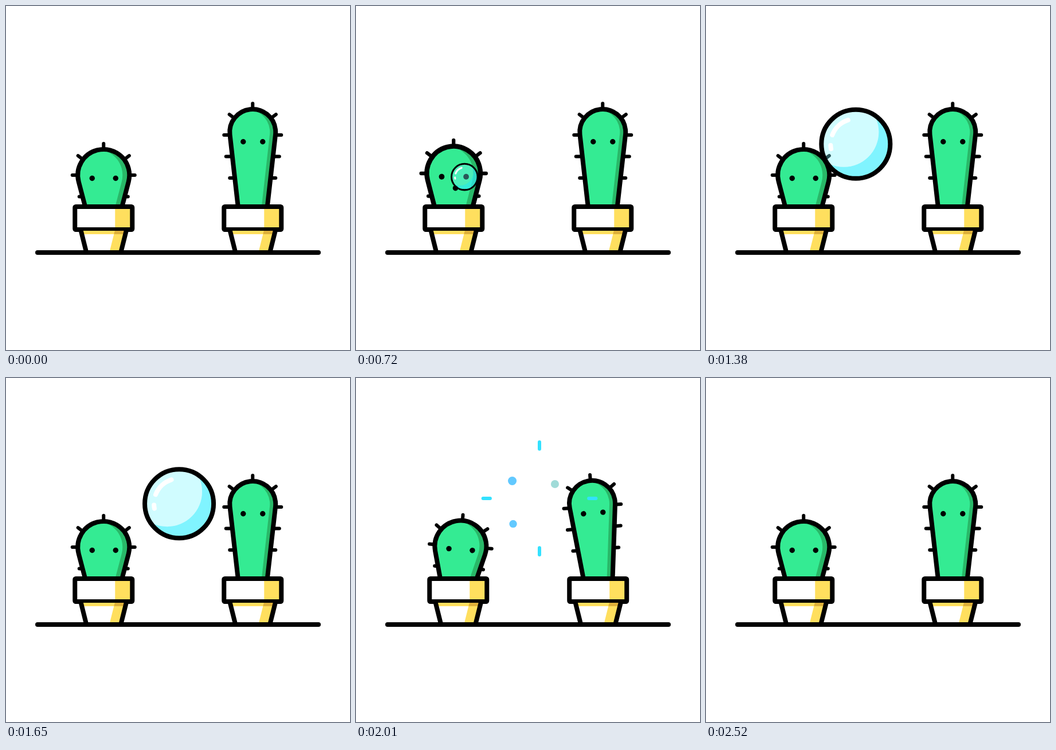
An HTML page with a canvas for the animation above (2550 ms loop, 600 by 600 pixels).

```html
<!DOCTYPE html>
<html lang="en">
<head>
<meta charset="utf-8">
<title>Cactus bubble</title>
<style>
  html, body { margin: 0; width: 100%; height: 100%; overflow: hidden; background: #fff; }
  canvas { display: block; }
</style>
</head>
<body>
<canvas id="stage" width="600" height="600"></canvas>
<script>
const ctx = document.getElementById('stage').getContext('2d');
const LOOP = 2550, STEP = 30, BLOW = 660, BURST = 1770, TAU = 2 * Math.PI;
const GREEN = '#34eb93', DARK_GREEN = '#29b868', YELLOW = '#ffdf5e', DARK_YELLOW = '#deb03a';

// A round head of radius r at height cy, tapering to a half width of base at y = 360.
const small = { x: 170.25, r: 45, cy: 295, base: 29.5, shade: 12, eyeX: 20.5, eyeY: 300.5, sideY: 295, tips: [54.5, 42.5] };
const tall = { x: 430.25, r: 40, cy: 220, base: 24.4, shade: 10, eyeX: 17, eyeY: 236.7, sideY: 225, tips: [50, 46.5, 40] };

const clamp = u => Math.min(1, Math.max(0, u));
const ramp = (t, from, to) => (1 - Math.cos(Math.PI * clamp((t - from) / (to - from)))) / 2;
const easeOut = (u, power) => 1 - (1 - clamp(u)) ** power;

// Damped swing after the burst, slowing down as it dies away.
function rock(t, size, swings, slowing, decay) {
  const u = clamp((t - BURST) / 740);
  return size * (1 - u) ** decay * Math.sin(Math.PI * swings * u ** slowing);
}

function line(x1, y1, x2, y2, width, color = '#000') {
  ctx.lineWidth = width;
  ctx.strokeStyle = color;
  ctx.beginPath();
  ctx.moveTo(x1, y1);
  ctx.lineTo(x2, y2);
  ctx.stroke();
}

function disc(x, y, r, color = '#000') {
  ctx.fillStyle = color;
  ctx.beginPath();
  ctx.arc(x, y, r, 0, TAU);
  ctx.fill();
}

function drawSpines(c) {
  line(0, c.cy - c.r - 10, 0, c.cy - c.r, 6);
  for (const side of [-1, 1]) {
    const dx = side * Math.cos(0.65), dy = -Math.sin(0.65), out = c.r + 11;
    line(dx * out, c.cy + dy * out, dx * c.r, c.cy + dy * c.r, 6);
    c.tips.forEach((tip, i) => {
      const y = c.sideY + 37.5 * i;
      line(side * tip, y, side * (tip - 8), y, 6);
    });
  }
}

function drawBody(c) {
  const height = 360 - c.cy;
  const tangent = Math.atan2(height, c.base) - Math.acos(c.r / Math.hypot(height, c.base));
  const shape = new Path2D();
  shape.moveTo(-c.base, 360);
  shape.arc(0, c.cy, c.r, Math.PI - tangent, TAU + tangent);
  shape.lineTo(c.base, 360);

  drawSpines(c);
  ctx.save();
  ctx.clip(shape);
  ctx.fillStyle = DARK_GREEN;
  ctx.fill(shape);
  ctx.translate(-c.shade, 0);
  ctx.fillStyle = GREEN;
  ctx.fill(shape);
  ctx.restore();
  ctx.lineWidth = 8;
  ctx.stroke(shape);
  for (const side of [-1, 1]) disc(0.5 + side * c.eyeX, c.eyeY, 4.7);
}

// Part of the tapered pot between two heights, from a left edge given at the rim.
function potSlice(color, left, top, bottom) {
  const inset = y => (y - 390) / 4;
  const slant = left < 0 ? 1 : -1;
  ctx.fillStyle = color;
  ctx.beginPath();
  ctx.moveTo(left + slant * inset(top), top);
  ctx.lineTo(40 - inset(top), top);
  ctx.lineTo(40 - inset(bottom), bottom);
  ctx.lineTo(left + slant * inset(bottom), bottom);
  ctx.fill();
}

function drawPot() {
  potSlice('#fff', -40, 390, 430);
  potSlice(YELLOW, 20, 390, 430);
  ctx.fillStyle = '#fff';
  ctx.fillRect(-50, 350, 100, 40);
  ctx.fillStyle = YELLOW;
  ctx.fillRect(20, 350, 30, 40);
  ctx.lineWidth = 8;
  ctx.beginPath();
  ctx.roundRect(-50, 350, 100, 40, 1.5);
  ctx.stroke();
  potSlice(YELLOW, -40, 392, 398);
  potSlice(DARK_YELLOW, 20, 392, 398);
  for (const side of [-1, 1]) line(side * 40, 390, side * 30, 430, 8);
}

function drawCactus(c, dx, dy, degrees, sx = 1, sy = 1) {
  ctx.save();
  ctx.translate(c.x + dx, 0);
  ctx.save();
  ctx.translate(0, 350 + dy);
  ctx.rotate(degrees * Math.PI / 180);
  ctx.scale(sx, sy);
  ctx.translate(0, -350);
  drawBody(c);
  ctx.restore();
  drawPot();
  ctx.restore();
}

function drawBubble(t) {
  if (t <= BLOW || t >= BURST) return;
  const grow = easeOut((t - BLOW) / 420, 3.1);
  const drift = Math.max(0, t - 1080);
  ctx.save();
  ctx.translate(173 + 43 * grow + 0.151 * drift, 318.5 - 53.7 * grow - 0.08 * drift);
  ctx.scale(grow, grow);

  const ball = new Path2D(), lit = new Path2D(), crescent = new Path2D();
  ball.arc(0, 0, 60, 0, TAU);
  lit.arc(-21, -21, 61, 0, TAU);
  crescent.rect(-90, -90, 180, 180);
  crescent.addPath(lit);
  ctx.save();
  ctx.clip(ball);
  ctx.fillStyle = 'rgba(120,246,255,.35)';
  ctx.fill(lit);
  ctx.fillStyle = 'rgba(51,238,255,.62)';
  ctx.fill(crescent, 'evenodd');
  ctx.restore();

  ctx.lineWidth = 8;
  ctx.strokeStyle = '#fff';
  for (const [from, to] of [[3.51, 4.4], [2.95, 3.09]]) {
    ctx.beginPath();
    ctx.arc(0, 0, 44, from, to);
    ctx.stroke();
  }
  ctx.strokeStyle = '#000';
  ctx.stroke(ball);
  ctx.restore();
}

function drawBurst(t) {
  const u = (t - BURST) / 400;
  if (u < 0 || u >= 1) return;
  const head = easeOut(u, 3), tail = easeOut(u, 1.6);
  const near = 30 + 73 * tail, far = 30 + 73 * head, size = 1 - u ** 3;
  ctx.save();
  ctx.translate(320, 210);
  disc(-50.7 * head, -32.6 * head, 9.6 * size, '#62c9ff');
  disc(28.8 * head, -26.7 * head, 9 * size, '#a0dbd8');
  disc(-49.1 * head, 47.5 * head, 8.5 * size, '#62c9ff');
  for (let i = 0; i < 4; i++) {
    line(near, 0, far, 0, 6, '#33e1ff');
    ctx.rotate(TAU / 4);
  }
  ctx.restore();
}

function draw(t) {
  ctx.fillStyle = '#fff';
  ctx.fillRect(0, 0, 600, 600);
  ctx.lineCap = ctx.lineJoin = 'round';
  ctx.strokeStyle = '#000';

  // Breathe in, blow, relax; then both plants rock from the burst.
  const breath = ramp(t, 130, 560) - 0.78 * ramp(t, 630, 725) - 0.22 * ramp(t, 1140, 1260);
  const push = rock(t, 13.6, 3, 0.755, 0.69);
  const dip = 0.19 * push;
  drawCactus(small, -push, dip, -rock(t, 10.2, 2.25, 0.567, 0.71), 1 + 0.175 * breath, 1 + 0.24 * breath);
  drawCactus(tall, push, dip, rock(t, 10.9, 3, 0.755, 1.6));

  const mouth = 4.8 * ramp(t, BLOW, 700) * (1 - ramp(t, 700, 1150));
  disc(173.5 + (t - 720) / 60, 317.7, mouth);
  line(55, 430, 545, 430, 8);
  drawBubble(t);
  drawBurst(t);
}

const start = performance.now();
function frame() {
  const t = (performance.now() - start) % LOOP;
  draw(Math.floor(t / STEP) * STEP);
  requestAnimationFrame(frame);
}
frame();
</script>
</body>
</html>
```
